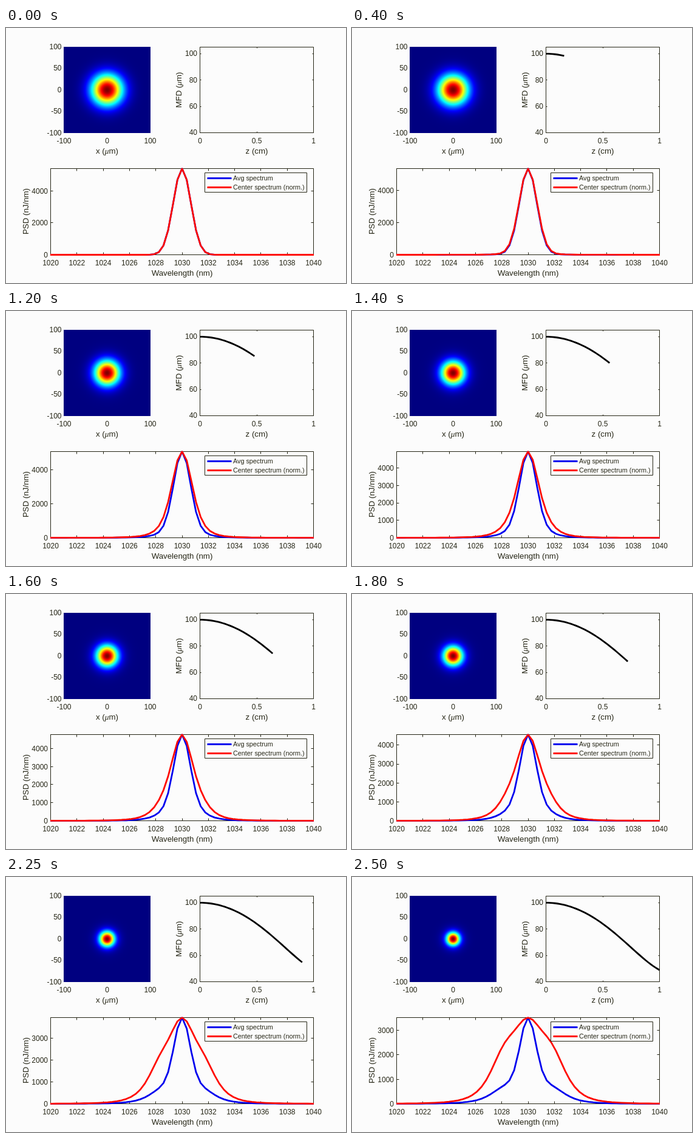
Animation of 560 by 420 pixels, one loop 2550 ms. Source, as an HTML page with a canvas:

```html
<!DOCTYPE html>
<html lang="en">
<head>
<meta charset="utf-8">
<title>Beam self-focusing</title>
<style>
  html, body { margin: 0; width: 100%; height: 100%; overflow: hidden; background: #fcfcfc; }
  canvas { display: block; }
</style>
</head>
<body>
<canvas id="stage" width="560" height="420"></canvas>
<script>
const ctx = document.getElementById('stage').getContext('2d');
const PAPER = '#fcfcfc', INK = '#262616', BLUE = '#0000ee', RED = '#ff0800';
const SANS = '"Liberation Sans", Arial, sans-serif';
const STEP_MS = 50, STEPS = 51;
const LINE_WIDTH = 2.8;
const LINE_STEP = 0.3537; // nm between spectral samples
const BEAM_SIZE = 142;

// Model: everything depends on the propagation distance z (0 to 1 cm)
const diameter = z => 100 - 51.1 * (1.27 * z ** 2 - 0.27 * z ** 6);
const peakPower = z => 5400 - 1875 * z ** 2.45;

// Focused core over a faint halo of light that is still wide
function beamLevel(r, z) {
  const w = diameter(z) / 2, halo = 0.12 * z;
  const gauss = width => Math.exp(-2 * (r / width) ** 2);
  return (1 - halo) * gauss(w * (1 - 0.15 * z)) + halo * gauss(w * 1.4);
}

// Launched Gaussian line, partly moved into a flat-topped broadened one
function spectrum(n, z, share, core) {
  const width = 4.8 + 3 * z ** 3;
  const broad = 1 / (1 + (n / width) ** (3.5 + z));
  return (1 - share) * Math.exp(-core * n * n) + share * broad;
}
const averageLevel = (n, z) => spectrum(n, z, 0.24 * z ** 1.3, 0.1395 + 0.04 * z);
const centerLevel = (n, z) => spectrum(n, z, 0.8 * z ** 1.8, 0.1395);

const range = (from, to, step) =>
  Array.from({ length: Math.floor((to - from) / step + 1e-6) + 1 }, (_, i) => from + i * step);

function text(str, x, y, align = 'center', size = 12) {
  ctx.font = `${size}px ${SANS}`;
  ctx.textAlign = align;
  ctx.textBaseline = 'middle';
  ctx.fillStyle = INK;
  ctx.fillText(str, x, y + 0.6);
}

// Axis title centred on a point, with the mu in a serif face
function title(str, x, y, turned) {
  const size = 13.3;
  const parts = str.split(/(μ)/).map(s => ({
    s, font: s === 'μ' ? `italic ${size}px "Liberation Serif", serif` : `${size}px ${SANS}`
  }));
  let total = 0;
  for (const part of parts) {
    ctx.font = part.font;
    total += part.width = ctx.measureText(part.s).width;
  }
  ctx.save();
  ctx.translate(x, y);
  if (turned) ctx.rotate(-Math.PI / 2);
  ctx.textAlign = 'left';
  ctx.textBaseline = 'alphabetic';
  ctx.fillStyle = INK;
  let pen = -total / 2;
  for (const part of parts) {
    ctx.font = part.font;
    ctx.fillText(part.s, pen, 4.7);
    pen += part.width;
  }
  ctx.restore();
}

function stroke(points, color, width) {
  ctx.beginPath();
  for (const [x, y] of points) ctx.lineTo(x, y);
  ctx.strokeStyle = color;
  ctx.lineWidth = width;
  ctx.lineJoin = 'round';
  ctx.stroke();
}

function frame(x, y, w, h, xTicks, yTicks, len) {
  ctx.strokeStyle = INK;
  ctx.lineWidth = 1;
  ctx.strokeRect(x, y, w, h);
  for (const t of xTicks) {
    const px = Math.floor(t) + 0.5;
    stroke([[px, y + h], [px, y + h - len]], INK, 1);
    stroke([[px, y], [px, y + len]], INK, 1);
  }
  for (const t of yTicks) {
    const py = Math.floor(t) + 0.5;
    stroke([[x, py], [x + len, py]], INK, 1);
    stroke([[x + w, py], [x + w - len, py]], INK, 1);
  }
}

const beam = document.createElement('canvas');
beam.width = beam.height = BEAM_SIZE;
const beamCtx = beam.getContext('2d');
const pixels = beamCtx.createImageData(BEAM_SIZE, BEAM_SIZE);

// One channel of the jet colour map, centred on mid quarters
const jet = (v, mid) => 255 * Math.max(0, Math.min(1, 1.5 - Math.abs(4 * v - mid)));

function drawBeam(z) {
  const middle = (BEAM_SIZE - 1) / 2;
  for (let i = 0; i < BEAM_SIZE ** 2; i++) {
    const dx = i % BEAM_SIZE - middle, dy = Math.floor(i / BEAM_SIZE) - middle;
    const v = beamLevel(Math.hypot(dx, dy) * 200 / BEAM_SIZE, z);
    pixels.data.set([jet(v, 3), jet(v, 2), jet(v, 1), 255], 4 * i);
  }
  beamCtx.putImageData(pixels, 0, 0);
  ctx.drawImage(beam, 95, 31, 143, 142);
  for (const v of range(-100, 100, 100)) text(v, 166.5 + v * 0.71, 186);
  for (const v of range(-100, 100, 50)) text(v, 91.5, 102 - v * 0.71, 'right');
  title('x (μm)', 166.5, 202);
}

function drawDiameter(step) {
  const px = z => 319.5 + 187 * z;
  const py = d => 172.5 - (d - 40) * 141 / 65;
  const xs = range(0, 1, 0.5), ys = range(40, 100, 20);
  frame(319.5, 31.5, 187, 141, xs.map(px), ys.map(py), 2);
  for (const z of xs) text(z, px(z), 186);
  for (const d of ys) text(d, 315, py(d), 'right');
  title('z (cm)', 413, 202);
  title('MFD (μm)', 284, 102, true);
  if (step > 0) {
    const points = range(0, step, 1).map(i => [px(i / 50), py(diameter(i / 50))]);
    stroke(points, '#000', LINE_WIDTH);
  }
}

function drawSpectrum(z) {
  const peak = peakPower(z);
  const px = nm => 73.5 + (nm - 1020) * 21.65;
  const py = level => 373.5 - 142 * level;
  const xs = range(1020, 1040, 2);
  const ys = range(0, peak, peak > 5000 ? 2000 : 1000);

  frame(73.5, 231.5, 433, 142, xs.map(px), ys.map(v => py(v / peak)), 4);
  for (const v of xs) text(v, px(v), 387);
  for (const v of ys) text(v, 69, py(v / peak) + 0.4, 'right');
  title('Wavelength (nm)', 290, 403);
  title('PSD (nJ/nm)', 32, 302, true);

  ctx.save();
  ctx.beginPath();
  ctx.rect(73, 230.5, 434, 145);
  ctx.clip();
  for (const [level, color] of [[averageLevel, BLUE], [centerLevel, RED]]) {
    const points = range(-29, 29, 1).map(n =>
      [px(1030 + n * LINE_STEP), py(level(Math.abs(n), z))]);
    stroke(points, color, LINE_WIDTH);
  }
  ctx.restore();
}

function drawLegend() {
  ctx.fillStyle = PAPER;
  ctx.fillRect(327.5, 238.5, 168, 32);
  ctx.strokeStyle = INK;
  ctx.lineWidth = 1;
  ctx.strokeRect(327.5, 238.5, 168, 32);
  const entries = [['Avg spectrum', BLUE], ['Center spectrum (norm.)', RED]];
  entries.forEach(([label, color], i) => {
    const y = 247.5 + 15 * i;
    stroke([[331.5, y], [371.5, y]], color, LINE_WIDTH);
    text(label, 374, y, 'left', 10.8);
  });
}

function draw(now) {
  const step = Math.floor(now / STEP_MS) % STEPS;
  const z = step / (STEPS - 1);
  ctx.fillStyle = PAPER;
  ctx.fillRect(0, 0, 560, 420);
  drawBeam(z);
  drawDiameter(step);
  drawSpectrum(z);
  drawLegend();
}

let start;
function tick(now) {
  start ??= now;
  draw(Math.max(0, now - start));
  requestAnimationFrame(tick);
}
draw(0);
requestAnimationFrame(tick);
</script>
</body>
</html>
```
